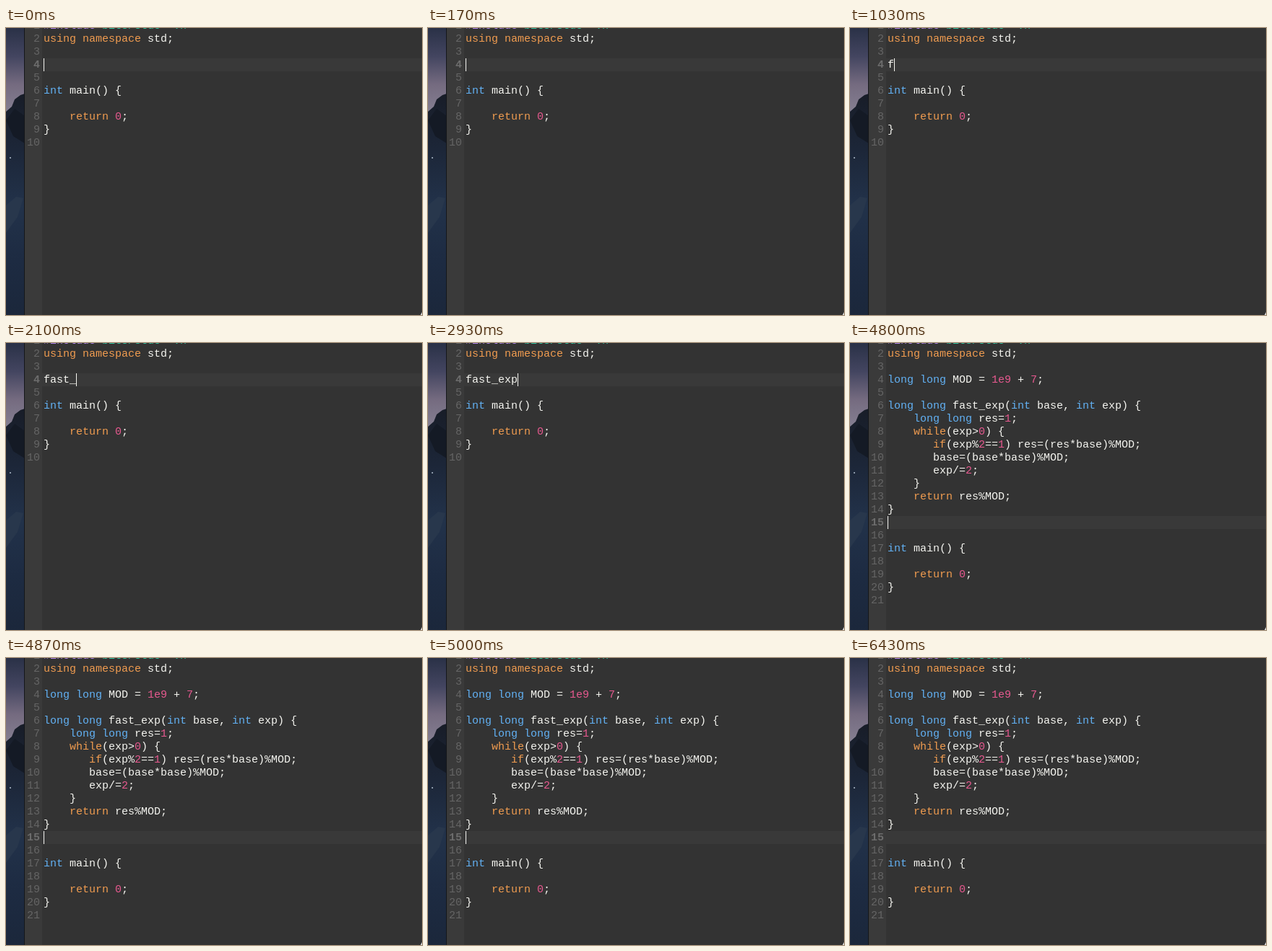
Write an HTML page with a canvas that moves like this. It is 576 px wide and 398 px high and loops after 6.46 s.

```html
<!DOCTYPE html>
<html lang="en">
<head>
<meta charset="utf-8">
<title>Snippet expansion</title>
<style>
html, body { margin: 0; width: 100%; height: 100%; overflow: hidden; background: #333; }
canvas { display: block; }
</style>
</head>
<body>
<canvas id="stage" width="576" height="398"></canvas>
<script>
const ctx = document.getElementById('stage').getContext('2d');
const LOOP = 6460, EXPAND = 4800;
const LINE = 18, CHAR = 9, LEFT = 52, TOP = -12;
const FONT = '15px "Liberation Mono", monospace';
const WORD = 'fast_exp.cpp';
const KEY_TIMES = [1030, 1230, 1370, 1530, 2100, 2400, 2700, 2900, 3230, 3370, 3530, 3700];
const CARET_OFF = [[500, 1030], [5670, 6030], [6430, LOOP]];

const HEAD = ['#include<bits/stdc++.h>', 'using namespace std;', ''];
const MAIN = ['', 'int main() {', '', '    return 0;', '}', ''];
const SNIPPET = `long long MOD = 1e9 + 7;

long long fast_exp(int base, int exp) {
    long long res=1;
    while(exp>0) {
       if(exp%2==1) res=(res*base)%MOD;
       base=(base*base)%MOD;
       exp/=2;
    }
    return res%MOD;
}
`.split('\n');

const TOKEN = /#include|<.*\.h>|\w+|[^\w\s]+/g;
function tokenColor(token) {
  if (token === '#include') return '#b084ee';
  if (/^<.*>$/.test(token)) return '#2fc5a0';
  if (/^(int|long)$/.test(token)) return '#62b1f4';
  if (/^(using|namespace|return|while|if)$/.test(token)) return '#f09c50';
  if (/^\d/.test(token)) return '#e6598f';
  return '#f5f5f0';
}

function rect(color, x, y, w, h) {
  ctx.fillStyle = color;
  ctx.fillRect(x, y, w, h);
}

function shape(color, ...points) {
  ctx.fillStyle = color;
  ctx.beginPath();
  points.forEach(([x, y]) => ctx.lineTo(x, y));
  ctx.fill();
}

function gradient(y0, y1, ...colors) {
  const fill = ctx.createLinearGradient(0, y0, 0, y1);
  colors.forEach((c, i) => fill.addColorStop(i / (colors.length - 1), c));
  return fill;
}

function drawWallpaper() {
  rect(gradient(0, 118, '#2a3147', '#434560', '#756b80', '#858092'), 0, 0, 26, 118);
  shape(gradient(92, 398, '#181d28', '#1c2638', '#22324a', '#1d2b42', '#1b273b'),
    [0, 116], [8, 109], [12, 99], [20, 93], [26, 91], [26, 398], [0, 398]);
  shape('#141a25', [0, 128], [12, 112], [26, 122], [26, 160], [10, 150]);
  shape('#28374c', [0, 246], [14, 234], [24, 236], [16, 262], [0, 284]);
  rect('#8b98a8', 5, 179, 2, 2);
  rect('#15171b', 25, 0, 1, 398);
}

function drawLine(text, row) {
  const y = TOP + row * LINE + 13;
  for (const match of text.matchAll(TOKEN)) {
    ctx.fillStyle = tokenColor(match[0]);
    ctx.fillText(match[0], LEFT + match.index * CHAR, y);
  }
}

function draw(t) {
  const expanded = t >= EXPAND;
  const typed = WORD.slice(0, KEY_TIMES.filter(k => k <= t).length);
  const lines = [...HEAD, ...(expanded ? SNIPPET : [typed]), ...MAIN];
  const activeRow = expanded ? 14 : 3;
  const activeY = TOP + activeRow * LINE;

  rect('#333333', 0, 0, 576, 398);
  drawWallpaper();
  rect('#3a3a3a', 26, 0, 24, 398);
  rect('#393939', 50, activeY, 526, LINE);

  lines.forEach((text, row) => {
    const active = row === activeRow;
    ctx.font = (active ? 'bold ' : '') + FONT;
    ctx.fillStyle = active ? '#6c6c6c' : '#656565';
    const label = String(row + 1);
    ctx.fillText(label, 47 - label.length * CHAR, TOP + row * LINE + 13);
    ctx.font = FONT;
    drawLine(text, row);
  });

  if (!CARET_OFF.some(([from, to]) => t >= from && t < to)) {
    const column = expanded ? 0 : typed.length;
    rect('#f5f5f0', LEFT + column * CHAR, activeY, 1, LINE);
  }
  shape('#e8e8e8', [576, 394], [576, 398], [574, 398]);
}

const start = performance.now();
function frame() {
  draw((performance.now() - start) % LOOP);
  requestAnimationFrame(frame);
}
frame();
</script>
</body>
</html>
```
